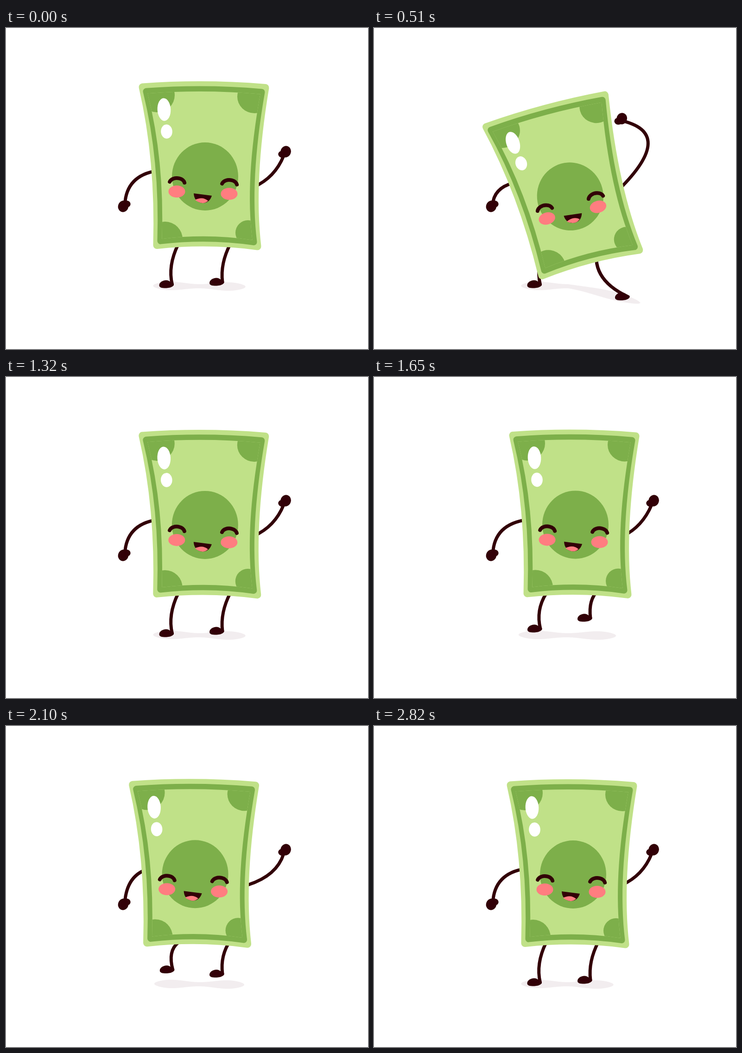
Animation, 781 px wide and 693 px high, one loop 3.3 s. Source, as an HTML page with a canvas:

```html
<!DOCTYPE html>
<html lang="en">
<head>
<meta charset="utf-8">
<title>Dancing banknote</title>
<style>
html, body { margin: 0; width: 100%; height: 100%; overflow: hidden; background: #fff; }
canvas { display: block; }
</style>
</head>
<body>
<canvas width="781" height="693"></canvas>
<script>
const ctx = document.querySelector('canvas').getContext('2d');
const LOOP = 3300, STEP = 30;
const LIGHT = '#c0e188', GREEN = '#7daf4a', INK = '#320007', PINK = '#ff7d80', SHADE = '#f2edef';

// Rises from 0 to 1 between start and peak, then falls back to 0 at end
function bump(t, start, peak, end) {
  if (t <= start || t >= end) return 0;
  const u = t < peak ? (t - start) / (peak - start) : (end - t) / (end - peak);
  return (1 - Math.cos(Math.PI * u)) / 2;
}

function oval(color, x, y, rx, ry, turn = 0) {
  ctx.fillStyle = color;
  ctx.beginPath();
  ctx.ellipse(x, y, rx, ry, turn, 0, 7);
  ctx.fill();
}

function fill(color, d) {
  ctx.fillStyle = color;
  ctx.fill(new Path2D(d));
}

function limb(x0, y0, cx, cy, x1, y1) {
  ctx.strokeStyle = INK;
  ctx.lineWidth = 7;
  ctx.beginPath();
  ctx.moveTo(x0, y0);
  ctx.quadraticCurveTo(cx, cy, x1, y1);
  ctx.stroke();
}

function leg(hipX, hipY, x, y) {
  limb(hipX, hipY, hipX - 22, y - 40, x, y);
  ctx.save();
  ctx.translate(x - 12, y);
  fill(INK, 'M-16 2C-16-4-9-9-1-9C7-9 9-3 15-2C18 4 8 8-2 8C-10 8-16 7-16 2Z');
  ctx.restore();
}

function hand(x, y, thumbX, thumbY) {
  oval(INK, x, y, 11.2, 12.5, .3);
  oval(INK, x + thumbX, y + thumbY, 8.7, 7.5);
}

// Two lobes with a waist; the right half follows the stepping foot
function shadow(stretch, spread) {
  const edge = (u, side) => {
    const out = Math.max(u, 0);
    const half = Math.sqrt(1 - u ** 6) * (7 - 2.5 * Math.cos(1.5 * Math.PI * u));
    ctx.lineTo(417 + (100 + spread) * u + 58 * out * stretch,
      557.5 + u + 35 * out ** 1.2 * stretch + side * half);
  };
  ctx.beginPath();
  for (let i = -50; i <= 50; i++) edge(i / 50, -1);
  for (let i = 50; i >= -50; i--) edge(i / 50, 1);
  ctx.fillStyle = SHADE;
  ctx.fill();
}

// The note's bowed outline, moved inwards; a round stroke softens the corners
function sheet(color, inset, round) {
  const dx = inset + round, dy = inset * 1.15 + round;
  const left = 286.5 + dx, right = 567.5 - dx;
  ctx.beginPath();
  ctx.moveTo(left, 119.5 + dy);
  ctx.quadraticCurveTo(427, 110 + dy, right, 121 + dy);
  ctx.quadraticCurveTo(534 - dx, 330, right - 17, 479.5 - dy);
  ctx.quadraticCurveTo(436, 465 - dy, left + 31, 477 - dy);
  ctx.quadraticCurveTo(323 + dx, 285, left, 119.5 + dy);
  ctx.closePath();
  ctx.fillStyle = ctx.strokeStyle = color;
  ctx.lineWidth = 2 * round;
  ctx.fill();
  if (round) ctx.stroke();
}

function eye(x, y) {
  ctx.strokeStyle = INK;
  ctx.lineWidth = 8;
  ctx.beginPath();
  ctx.ellipse(x, y, 16.5, 12, .06, 1.08 * Math.PI, 1.92 * Math.PI);
  ctx.stroke();
}

function note() {
  sheet(LIGHT, 0, 8);
  sheet(GREEN, 9, 7);
  sheet(LIGHT, 19, 0);
  ctx.save();
  ctx.clip();
  oval(GREEN, 326, 145, 38, 37);
  oval(GREEN, 536, 148, 37, 36);
  oval(GREEN, 343, 456, 38, 38);
  oval(GREEN, 522, 442, 27, 27);
  ctx.restore();
  oval(GREEN, 429.5, 320.5, 71.5, 73.5);

  oval('#fff', 341, 176, 14.3, 24.5, -.05);
  oval('#fff', 346.5, 223.5, 12.3, 15.3, -.05);
  oval(PINK, 368.5, 353, 18, 13);
  oval(PINK, 481.5, 358, 18, 13);
  eye(369, 336);
  eye(482, 340);
  fill(INK, 'M405 357L444 362Q439 378 424 378Q406 376 405 357Z');
  fill(PINK, 'M408 371Q424 363 436 373Q431 378 424 378Q415 377 408 371Z');
}

function draw(t) {
  // Opening lean with a side step and a wave
  const lean = 1.09 * bump(t, 0, 420, 900);
  const step = bump(t, 0, 480, 900);
  const wave = 1.03 * bump(t, 0, 450, 980);

  // Then a side-to-side dance, one sway per beat
  const beat = k => bump(t, 1110 + 410 * (k - 1), 1110 + 410 * k, 1110 + 410 * (k + 1));
  const left1 = bump(t, 780, 1110, 1520), right1 = beat(1), left2 = beat(2), right2 = beat(3);
  const x = 20 * (right1 + right2) - 22 * left1 - 45.5 * left2;
  const y = -2.1 * (right1 + right2);

  const hop = bump(t, 1320, 1520, 1930);
  const liftL = .6 * bump(t, 900, 1110, 1310) + left2;
  const liftR = hop + bump(t, 1930, 2340, 2820);

  ctx.fillStyle = '#fff';
  ctx.fillRect(0, 0, 781, 693);
  ctx.lineCap = ctx.lineJoin = 'round';
  shadow(bump(t, 0, 495, 1030), 10 * (hop - left2 + right2));

  leg(371, 468, 358.5 + 2 * liftL, 553.5 - 43.5 * liftL);
  leg(484, 466 - 8 * liftR, 467 + 82 * step, 548.5 + 32 * step - 36.5 * liftR);

  limb(335 + x - 23 * lean, 307 + 25 * lean, 264, 314 - .15 * x + 26 * lean, 257, 374);
  hand(253, 385, 7, -5);

  limb(535 + .6 * x - 15 * wave, 343 + 14 * wave,
    580 - .2 * x + 73 * wave, 323 - 93 * wave,
    599 - 61 * wave, 276 - 75 * wave);
  hand(603.5 - 69 * wave, 267 - 71.5 * wave, -7.5, 5.5);

  ctx.save();
  ctx.translate(434 + x + 35 * lean, 476 + y + 36.5 * lean);
  ctx.rotate(-.269 * lean);
  ctx.translate(-434, -476);
  note();
  ctx.restore();
}

function tick() {
  draw(Math.floor(performance.now() % LOOP / STEP) * STEP);
  requestAnimationFrame(tick);
}
tick();
</script>
</body>
</html>
```
